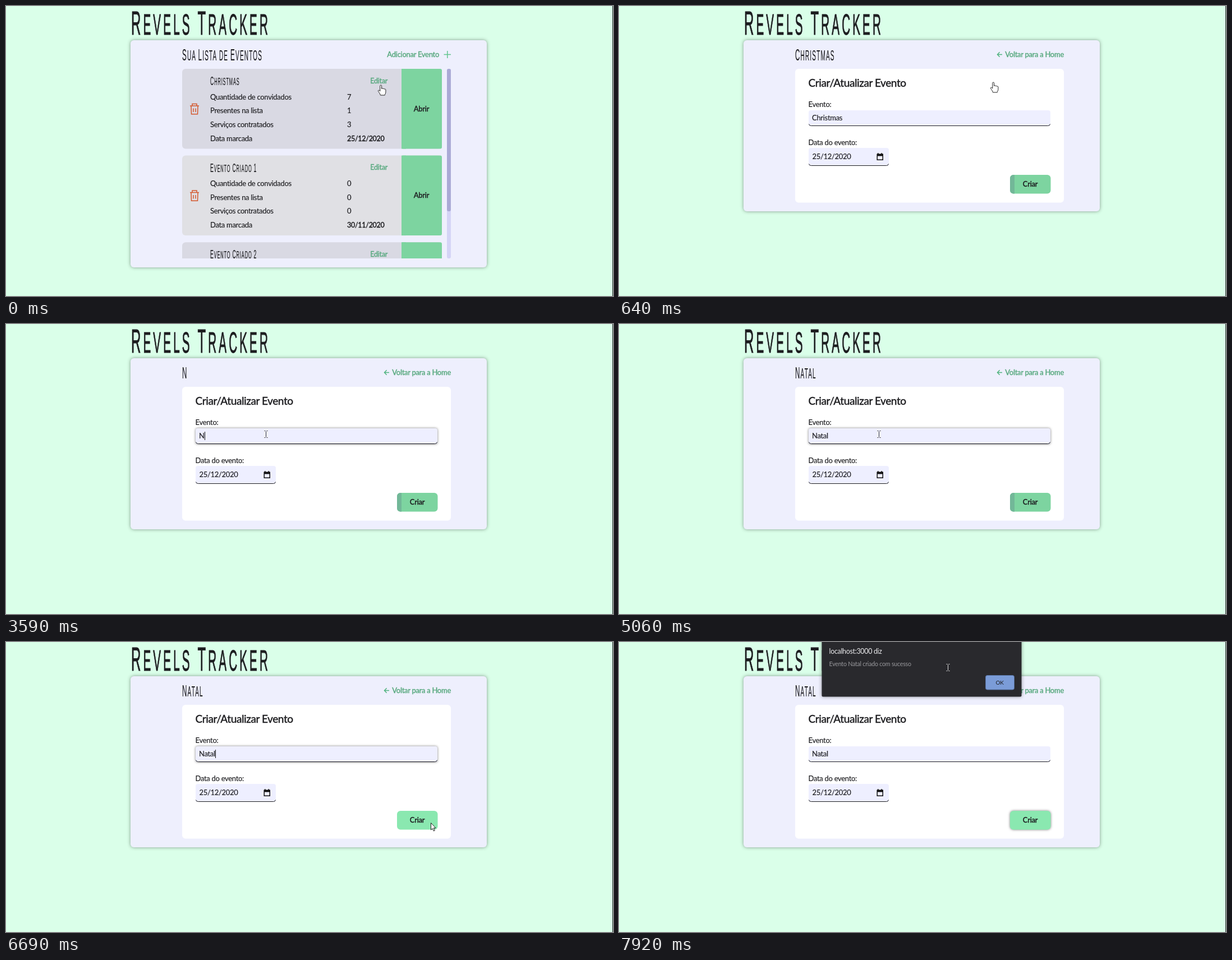
Recreate the animation shown at these times as an HTML page. Size 1082 by 517 pixels, loop 8 s.

```html
<!DOCTYPE html>
<html lang="pt-BR">
<head>
<meta charset="utf-8">
<title>Revels Tracker</title>
<style>
  html, body { margin: 0; width: 100%; height: 100%; overflow: hidden; background: #daffe9; }
  svg { display: block; width: 100%; height: 100%; }
  text { font: 13px Lato, sans-serif; letter-spacing: -.023em; fill: #1d1d20; stroke: #1d1d20; stroke-width: .15; white-space: pre; }
  .display { font-family: "Liberation Sans", Arial, sans-serif; letter-spacing: .12em; stroke-width: .2; }
  .medium { font-weight: 500; stroke-width: .3; }
  .link { font-weight: 500; fill: #58a97f; stroke: #58a97f; stroke-width: .3; }
  .system { stroke: none; }
  .middle { text-anchor: middle; }
  .end { text-anchor: end; }
  .shadow { filter: drop-shadow(0 0 3px rgba(0, 0, 0, .4)); }
  .glow { filter: drop-shadow(0 0 2px rgba(0, 0, 0, .5)); }
  .line { fill: none; stroke-width: 1.5; }
</style>
</head>
<body>
<svg id="stage" viewBox="0 0 1082 517"></svg>
<script>
const LOOP = 8000, STEP = 77, STEP_OFFSET = 63;
const GREEN = '#7dd4a0', LIGHT_GREEN = '#8ae8b0', FIELD = '#eeefff';

const rect = (x, y, w, h, fill, r = 0, extra = '') =>
  `<rect x="${x}" y="${y}" width="${w}" height="${h}" rx="${r}" fill="${fill}" ${extra}/>`;
const text = (s, x, y, cls = '', size = 13, style = '', id = '') =>
  `<text ${id && `id="${id}"`} x="${x}" y="${y}" class="${cls}" style="font-size:${size}px;${style}">${s}</text>`;

// Narrow small-caps lettering for headings
const smallCaps = (s, size) => [...s].map(c =>
  /[A-Z0-9]/.test(c) ? `<tspan style="font-size:${size}px">${c}</tspan>` : c.toUpperCase()).join('');
const display = (s, x, y, size, style = '', id = '') =>
  `<text ${id && `id="${id}"`} class="display" transform="translate(${x} ${y}) scale(.4 1)"
    style="font-size:${size * .86}px;${style}">${smallCaps(s, size)}</text>`;

const trash = `<path class="line" stroke="#d4572c" d="M-8-5.5H8M-4-6V-9H4V-6M-6-5L-5.5 9.2H5.5L6-5M-2-1V5.5M2-1V5.5"/>`;

function card(index, name, values, date) {
  const labels = ['Quantidade de convidados', 'Presentes na lista', 'Serviços contratados'];
  return `<g transform="translate(314 ${112 + index * 154.6})">
    ${rect(0, 0, 463, 142.5, index % 2 ? '#e0e0e4' : '#d9d9e3', 6)}
    ${rect(391, 0, 72, 142.5, GREEN, 3)}${rect(391, 0, 8, 142.5, GREEN)}
    <g transform="translate(22 71.5)">${trash}</g>
    ${display(name, 50, 29, 21.6)}
    ${text('Editar', 366, 25.5, 'link end', 12.5)}
    ${labels.map((label, i) => text(label, 50, 54.5 + i * 24.6) + text(values[i], 294, 54.5 + i * 24.6)).join('')}
    ${text('Data marcada', 50, 128.5)}${text(date, 294, 128.5, 'medium', 12.5)}
    ${text('Abrir', 426.5, 75.5, 'middle medium')}
  </g>`;
}

const field = (x, y, w, h, id) => `<g id="${id}">
  ${rect(x, y, w, h, FIELD, 4)}
  <path d="M${x + .5} ${y + h - 3.5}q.5 3 4 3h${w - 9}q3.5 0 4-3" fill="none" stroke="#1d1d20"/></g>`;

const listScreen = `<g id="list">
  ${rect(222, 61, 635, 405, '#eeeffd', 6, 'class="shadow"')}
  ${display('Sua Lista de Eventos', 314, 97, 29)}
  ${text('Adicionar Evento', 772, 90.5, 'link end')}
  <path class="line" stroke="#62c58f" d="M780.5 86.5H793M786.8 80V93"/>
  <g clip-path="url(#viewport)">
    ${card(0, 'Christmas', [7, 1, 3], '25/12/2020')}
    ${card(1, 'Evento Criado 1', [0, 0, 0], '30/11/2020')}
    ${card(2, 'Evento Criado 2', [0, 0, 0], '30/11/2020')}
  </g>
  ${rect(786, 112, 7, 338, '#d4d4f6', 3)}${rect(786, 112, 7, 254, '#aaaad6', 3)}
</g>`;

const formScreen = `<g id="form">
  ${rect(222, 61, 635, 305, '#eeeffd', 6, 'class="shadow"')}
  ${display('', 314, 97, 29, '', 'heading')}
  <path class="line" stroke="#4fb37f" d="M683 86.5H674.8M678.6 82.2L674.5 86.5L678.6 90.8"/>
  ${text('Voltar para a Home', 793, 90.5, 'link end')}
  ${rect(314, 112, 479, 238.5, '#fff', 6)}
  ${text('Criar/Atualizar Evento', 337.5, 143.5, 'medium', 19)}
  ${text('Evento:', 337.5, 180)}
  ${field(338, 186, 431, 28, 'nameField')}
  ${text('', 344, 204, '', 13, '', 'nameText')}
  ${text('Nome do evento (ex.: Festa da família)', 344, 204, 'system', 13, 'fill:#8a8a92', 'placeholder')}
  ${rect(0, 192, 1, 15, '#111', 0, 'id="caret"')}
  ${text('Data do evento:', 337.5, 247.5)}
  ${field(338, 253, 143, 32, 'dateField')}
  ${text('25/12/2020', 344.5, 273)}
  <path d="M459.5 263.5h1.500v-1.500h1.500v1.500h5v-1.500h1.500v1.500h2v11.500h-11.500zM461 267.500v6h8.500v-6z" fill="#111" fill-rule="evenodd"/>
  ${rect(697, 301, 72.5, 33.5, GREEN, 6, 'id="button"')}
  <path id="strip" d="M705 301H703a6 6 0 0 0-6 6V328.500a6 6 0 0 0 6 6H705Z" fill="#72b798"/>
  ${text('Criar', 733, 322, 'middle medium')}
</g>`;

const dialogBox = `<g id="dialog">
  ${rect(361.5, -4, 356, 101.5, '#29292d', 2, 'class="shadow"')}
  ${text('localhost:3000 diz', 374.5, 20.5, 'system', 12.4, 'fill:#ececee')}
  ${text('Evento Natal criado com sucesso', 374.5, 43, 'system', 10.7, 'fill:#99999d')}
  ${rect(653.5, 59.5, 51, 25.5, '#7b9cd8', 3, 'stroke="#56709f"')}
  ${text('OK', 678.5, 75.5, 'system middle', 10)}
</g>`;

const cursors = `<g id="pointer">
  <circle id="click" cx="-1" cy="-1" r="9" fill="#f4f384"/>
  <path id="hand" transform="translate(2 9)" fill="#fff" stroke="#222" d="M-3.2 2V-7.6a1.4 1.4 0 0 1 2.8 0V-2.5a1.4 1.4 0 0 1 2.6.3a1.4 1.4 0 0 1 2.5.6a1.3 1.3 0 0 1 2.2.9V3.5C6.9 6 5.5 6.5 5.2 9H-2.6C-3 6.5-5 4.5-6.6 1.6C-7 .3-5.3-.4-4.4.7Z"/>
  <path id="arrow" fill="#fff" stroke="#222" d="M.5.5V13L3.3 10.4L5.3 15L7.3 14.1L5.3 9.6H9Z"/>
  <path id="beam" transform="translate(.5 .5)" fill="none" d="M-3-6H-1M1-6H3M0-5V5M-3 6H-1M1 6H3"/>
</g>`;

const $ = id => document.getElementById(id);
$('stage').innerHTML = `
  <clipPath id="viewport">${rect(314, 112, 463, 338, '#000')}</clipPath>
  ${rect(0, 0, 1082, 517, '#daffe9')}
  ${display('Revels Tracker', 223, 51, 60, 'letter-spacing:.2em;stroke-width:1')}
  ${listScreen}${formScreen}${dialogBox}
  ${rect(1081, 0, 1, 517, '#1f2a25')}${cursors}`;

// Pointer hot spot: time, x, y
const path = [
  [0, 668, 141], [80, 668, 140], [310, 667, 136], [840, 667, 136],
  [1000, 645, 142], [1300, 540, 170], [1520, 480, 194], [1630, 464, 202],
  [1700, 464, 202], [1780, 456, 205], [2720, 456, 205], [2810, 463, 196],
  [5500, 463, 196], [5610, 482, 199], [5840, 568, 214], [6069, 660, 240],
  [6290, 757, 316], [6600, 757, 322], [6690, 757, 322], [7000, 737, 317],
  [7270, 737, 317], [7420, 715, 270], [7650, 640, 125], [7830, 592, 55], [7900, 586, 45]
];
const shapes = [[0, 'hand'], [840, 'arrow'], [1480, 'beam'], [5600, 'arrow'], [6760, 'hand'], [7300, 'arrow'], [7800, 'beam']];
const names = [[0, 'Christmas'], [2970, ''], [3590, 'N'], [3740, 'Na'], [4050, 'Nat'], [4360, 'Nata'], [4510, 'Natal']];
const clicks = [[480, 640], [2270, 2340], [7060, 7220]];
const caretOff = [[5060, 5530], [6140, 6600]];

const latest = (track, t) => track.filter(k => k[0] <= t).pop()[1];
const within = (spans, t) => spans.some(([a, b]) => t >= a && t < b);
const show = (id, on) => $(id).style.display = on ? '' : 'none';

function pointerAt(t) {
  const i = path.findIndex(k => k[0] > t);
  if (i < 0) return path[path.length - 1].slice(1);
  const [t0, x0, y0] = path[i - 1], [t1, x1, y1] = path[i];
  const p = (t - t0) / (t1 - t0);
  return [Math.round(x0 + (x1 - x0) * p), Math.round(y0 + (y1 - y0) * p)];
}

let shownName = null;
function setName(name) {
  if (name === shownName) return;
  shownName = name;
  $('nameText').textContent = name;
  $('heading').innerHTML = smallCaps(name, 29);
  const width = name ? $('nameText').getComputedTextLength() : 0;
  $('caret').setAttribute('x', Math.round(344 + width));
}

function render(t) {
  const formOpen = t >= 560, focused = t >= 2270 && t < 7060, hover = t >= 6300;
  show('list', !formOpen);
  show('form', formOpen);
  show('dialog', t >= 7220);
  if (formOpen) setName(latest(names, t));
  show('placeholder', shownName === '');
  show('caret', focused && !within(caretOff, t));
  $('nameField').setAttribute('class', focused ? 'glow' : '');
  $('button').setAttribute('fill', hover ? LIGHT_GREEN : GREEN);
  $('button').setAttribute('class', t >= 7060 ? 'glow' : '');
  show('strip', !hover);

  const stepped = Math.max(0, STEP_OFFSET + Math.floor((t - STEP_OFFSET) / STEP) * STEP);
  const shape = latest(shapes, stepped);
  for (const id of ['hand', 'arrow', 'beam']) show(id, id === shape);
  show('click', within(clicks, t));
  $('beam').setAttribute('stroke', t >= 7220 ? '#e4e4e4' : '#333');
  $('pointer').setAttribute('transform', `translate(${pointerAt(stepped)})`);
}

function frame() {
  render(performance.now() % LOOP);
  requestAnimationFrame(frame);
}
frame();
</script>
</body>
</html>
```
